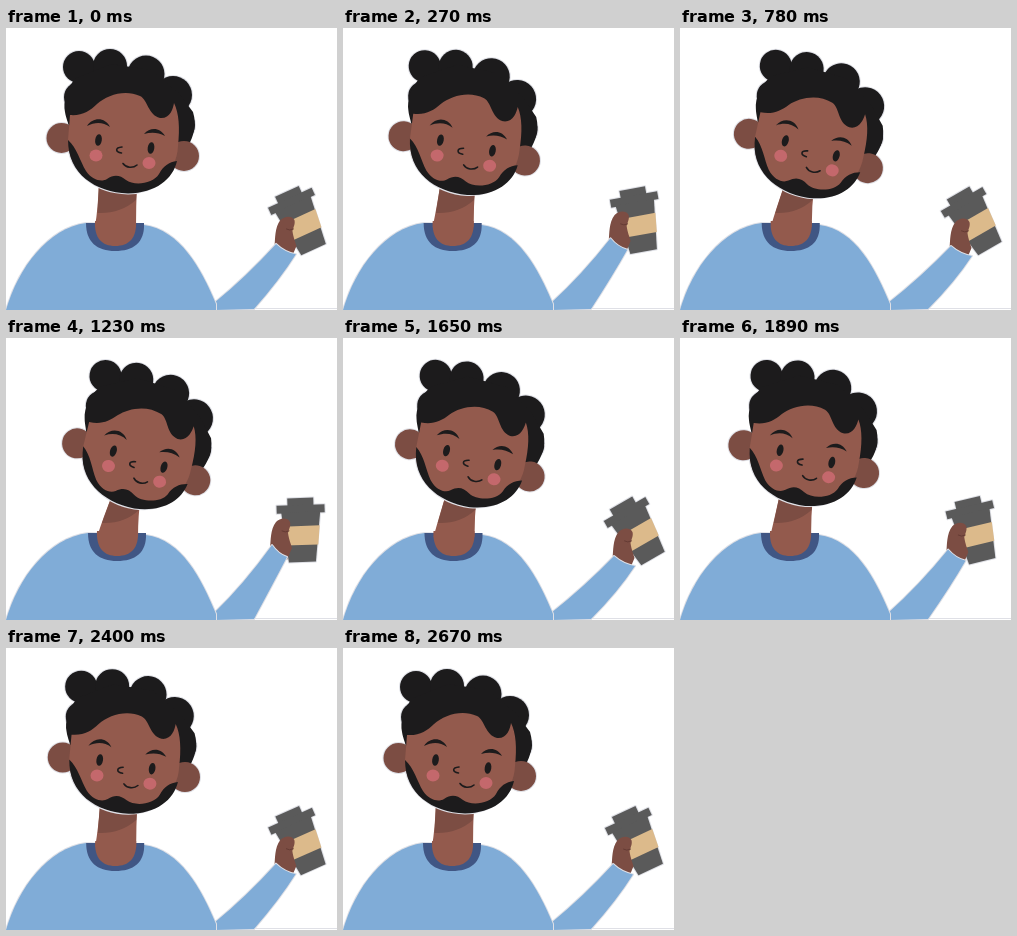
Recreate the animation shown at these times as an HTML page with a canvas. Size 331 by 282 pixels, loop 2700 ms.

```html
<!DOCTYPE html>
<html lang="en">
<head>
<meta charset="utf-8">
<title>Coffee break</title>
<style>
  html, body { margin: 0; width: 100%; height: 100%; overflow: hidden; background: #fff; }
  canvas { display: block; width: 331px; height: 282px; }
</style>
</head>
<body>
<canvas id="stage" width="331" height="282"></canvas>
<script>
const ctx = document.getElementById('stage').getContext('2d');
const LOOP = 2700, STEP = 30;
const HAIR = '#1c1b1c', SKIN = '#935a4d', SHADE = '#7c4d43', SHIRT = '#80acd7',
      COLLAR = '#405684', CUP = '#5a5a5a', BAND = '#dcba8b', BLUSH = '#c4686c', EDGE = '#dfe0e6';

// Swing phases in degrees at a few times of the loop.
const times = [0, 270, 780, 1230, 1650, 2160, 2670, 2700];
const headPhase = [0, 70, 136, 182, 241, 300, 357, 360];
const cupPhase = [52, 114, 352, 540, 720, 932, 1130, 1132];

const mix = (a, b, k) => a + (b - a) * k;

function swing(phases, t) {
  let i = 0;
  while (i < times.length - 2 && t >= times[i + 1]) i++;
  const k = (t - times[i]) / (times[i + 1] - times[i]);
  return (1 - Math.cos(mix(phases[i], phases[i + 1], k) * Math.PI / 180)) / 2;
}

function fill(color, d, edged) {
  const path = new Path2D(d);
  if (edged) line(EDGE, 2, d);
  ctx.fillStyle = color;
  ctx.fill(path);
}

function line(color, width, d) {
  ctx.strokeStyle = color;
  ctx.lineWidth = width;
  ctx.lineCap = ctx.lineJoin = 'round';
  ctx.stroke(new Path2D(d));
}

function oval(color, x, y, rx, ry = rx, tilt = 0) {
  ctx.fillStyle = color;
  ctx.beginPath();
  ctx.ellipse(x, y, rx, ry, tilt, 0, Math.PI * 2);
  ctx.fill();
}

function placed(x, y, angle, draw) {
  ctx.save();
  ctx.translate(x, y);
  ctx.rotate(angle * Math.PI / 180);
  draw();
  ctx.restore();
}

function drawBody(h) {
  const dx = 2 * h;
  fill(SHIRT, `M0 282C12 240 42 200 ${80 + dx} 195L${138 + dx} 197C${174 + dx} 202 195 240 210 276L210 282Z`, true);
  placed(dx, 0, 0, () => {
    fill(COLLAR, 'M80 195C80 214 91 223 109 223C127 223 139 215 138 195Z');
    fill(SKIN, 'M89 193C88 210 96 218 109 218C123 218 131 210 130 193Z');
  });
  const left = mix(93, 107, h), right = mix(131, 135, h);
  const base = 89 + dx, end = 130 + dx;
  fill(SKIN, `M${left} 155L${right} 155Q${mix(130, 132, h)} 178 ${end} 199L${base} 199Q${mix(92, 97, h)} 180 ${left} 155Z`);
  fill(SHADE, `M${left} 155L${right} 155L${mix(130, 133, h)} 172Q${mix(114, 118, h)} 186 ${mix(91.5, 96, h)} 185Z`);
}

const hairBumps = [[73, 39, 16], [104, 38, 17], [140, 46, 18.5], [167, 67, 19], [73, 69, 15], [171, 97, 18]];

function drawHair() {
  for (const [x, y, r] of hairBumps) oval(EDGE, x, y, r + 1);
  for (const [x, y, r] of hairBumps) oval(HAIR, x, y, r);
  fill(HAIR, 'M59 84C57 75 60 60 70 50L105 36L145 42L172 64L187 84C191 97 187 109 183 116L165 120L64 105C64 98 60 91 59 84Z');
}

function drawHead() {
  oval(EDGE, 55.5, 110, 16);
  oval(EDGE, 178, 128, 16);
  line(EDGE, 2, 'M62 115C63 145 90 165 122 165.5C150 165 168 147 171 130');
  drawHair();
  oval(SHADE, 55.5, 110, 15);
  oval(SHADE, 178, 128, 15);
  fill(SKIN, 'M64 87C76 88 84 83 91 76C101 67 119 61 134 68C142 72 142 87 154 90C164 91 167 81 168 75C173 85 174 100 172 118C171 145 148 164 122 164C88 162 62 144 62 112Z');
  fill(HAIR, 'M62 112C71 120 74 133 80 143C87 153 96 154 101 151C108 146 114 147 120 152C128 158 147 156 153 146C157 138 163 134 171 133C167 151 150 165 122 165.5C89 164 62 146 62 112Z');

  oval(BLUSH, 90, 127.5, 6.5, 6);
  oval(BLUSH, 143, 135, 6.5, 6);
  oval(HAIR, 92.5, 112, 3.3, 5.8, .15);
  oval(HAIR, 145, 120, 3.3, 5.8, .15);
  fill(HAIR, 'M81 98C87 89 99 89 104 99C97 94 89 94 81 98Z');
  fill(HAIR, 'M138 106C144 99 154 99 159 108C152 104 145 104 138 106Z');
  line(HAIR, 1.6, 'M116 119C109 119.5 109 124 115.5 125');
  line(HAIR, 1.6, 'M117 135.5C120 140 127 140.5 131 137');
}

function drawCup() {
  const parts = ['M-13 -37H13V-29H-13Z', 'M-24 -30H24V-22H-24Z', 'M-19.5 -23H19.5L13.5 27H-13.5Z'];
  parts.forEach(d => line(EDGE, 2, d));
  parts.forEach(d => fill(CUP, d));
  fill(BAND, 'M-18.5 -9H18.5L16.5 10H-16.5Z');
}

function drawArm(s) {
  placed(295.5 + s, 197, -(2 + 28 * s), drawCup);
  placed(5.5 * s, 10 * s, 0, () => {
    fill(SHADE, 'M264 211C265 202 264 192 270 184C274 180 281 179 284 184C285 188 283 191 282 195C283 202 285 206 286 210L281 222Z');
    line('#653b34', 1, 'M276 193Q279 195 283 193');
  });
  const wx = mix(266, 271, s), wy = mix(207, 218, s);
  const ex = mix(281, 292, s), ey = mix(219, 228, s);
  fill(SHIRT, `M208 275Q${mix(238, 241, s)} ${mix(246, 249, s)} ${wx} ${wy}Q${mix(272, 280, s)} ${mix(216, 226, s)} ${ex} ${ey}Q${mix(268, 275, s)} ${mix(244, 254, s)} 248 281L209 282Z`, true);
}

function draw(t) {
  const h = swing(headPhase, t), s = 1 - swing(cupPhase, t);
  ctx.fillStyle = '#fff';
  ctx.fillRect(0, 0, 331, 282);
  ctx.fillStyle = EDGE;
  ctx.fillRect(248, 280, 83, 1);
  drawArm(s);
  drawBody(h);
  placed(93, 207, 9 * h, () => {
    ctx.translate(-93, -207);
    drawHead();
  });
}

const start = performance.now();
function tick() {
  const t = (performance.now() - start) % LOOP;
  draw(Math.floor(t / STEP) * STEP);
  requestAnimationFrame(tick);
}
tick();
</script>
</body>
</html>
```
